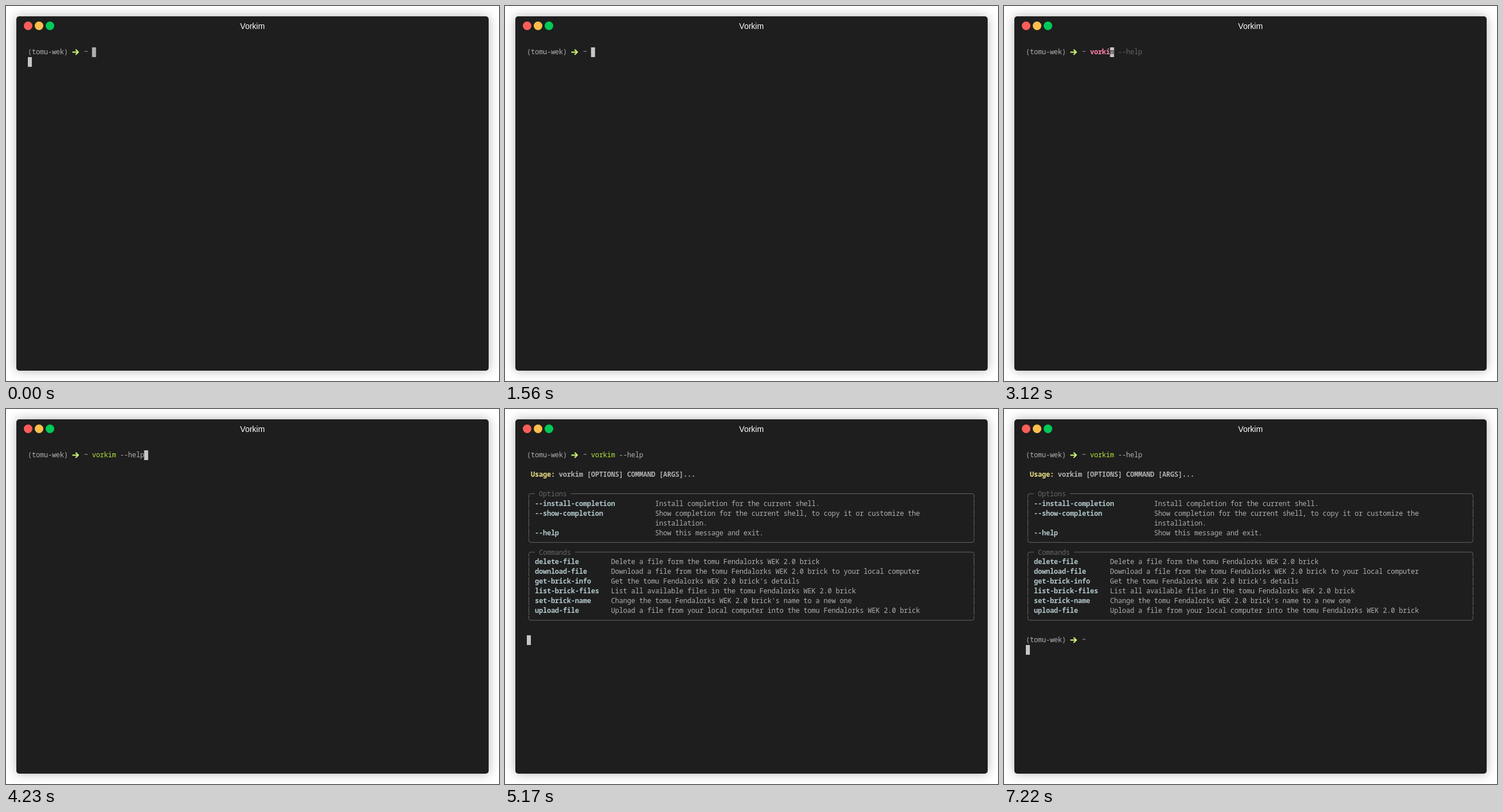
Recreate the animation shown at these times as an HTML page with a canvas. Size 858 by 653 pixels, loop 8390 ms.

```html
<!DOCTYPE html>
<html lang="en">
<head>
<meta charset="utf-8">
<title>Vorkim</title>
<style>
  html, body { margin: 0; width: 858px; height: 653px; overflow: hidden; background: #fff; }
  .window {
    position: absolute; left: 18px; top: 18px; width: 822px; height: 617px;
    border-radius: 5px; background: #1e1e1e; box-shadow: 0 0 18px rgba(0, 0, 0, .3);
  }
  canvas { position: absolute; left: 0; top: 0; }
</style>
</head>
<body>
<div class="window"></div>
<canvas id="stage" width="858" height="653"></canvas>
<script>
const ctx = document.getElementById('stage').getContext('2d');
const LOOP = 8390;
const LEFT = 38, TOP = 72, CELL = 6.98, LINE = 16.95;
const COLS = 112, INPUT = 16;
const FONT = '11.97px "Noto Sans Mono", "DejaVu Sans Mono", monospace';
const FG = '#afafaf', CURSOR = '#c7c7c7', BG = '#1e1e1e', DIM = '#666666', HINT = '#626566';
const GREEN = '#b3e33b', LIME = '#c8ed71', PINK = '#ff7fac', YELLOW = '#ebdf86', CYAN = '#b1c6ca';

const CMD = 'vorkim', ARGS = ' --help';
const KIT = 'tomu Fendalorks WEK 2.0 brick';
const OPTIONS = [
  ['--install-completion', 'Install completion for the current shell.'],
  ['--show-completion', 'Show completion for the current shell, to copy it or customize the'],
  ['', 'installation.'],
  ['--help', 'Show this message and exit.']
];
const COMMANDS = [
  ['delete-file', `Delete a file form the ${KIT}`],
  ['download-file', `Download a file from the ${KIT} to your local computer`],
  ['get-brick-info', `Get the ${KIT}'s details`],
  ['list-brick-files', `List all available files in the ${KIT}`],
  ['set-brick-name', `Change the ${KIT}'s name to a new one`],
  ['upload-file', `Upload a file from your local computer into the ${KIT}`]
];

// [start, typed characters, suggestion visible]
const TYPING = [
  [1560, 0, false], [2210, 1, false], [2310, 1, true], [2620, 2, false], [2720, 2, true],
  [2870, 3, true], [2980, 4, true], [3120, 5, true], [3390, 6, true], [3490, 7, true],
  [4230, 13, false]
];

const colX = col => LEFT + col * CELL;
const rowY = row => TOP + row * LINE;

function text(row, col, str, color, bold) {
  ctx.font = (bold ? 'bold ' : '') + FONT;
  ctx.textAlign = 'left';
  ctx.fillStyle = color;
  [...str].forEach((ch, i) => {
    if (ch !== ' ') ctx.fillText(ch, colX(col + i), rowY(row) + 12);
  });
}

function block(row, col, color = CURSOR) {
  ctx.fillStyle = color;
  ctx.fillRect(colX(col), rowY(row), CELL, LINE);
}

function stroke(color, width, draw) {
  ctx.strokeStyle = color;
  ctx.lineWidth = width;
  ctx.beginPath();
  draw();
  ctx.stroke();
}

function prompt(row) {
  text(row, 0, '(tomu-wek)', FG);
  text(row, 14, '~', FG);
  const y = rowY(row) + 8.3;
  ctx.lineCap = ctx.lineJoin = 'round';
  stroke(LIME, 2.2, () => {
    ctx.moveTo(116.3, y);
    ctx.lineTo(125.5, y);
    ctx.moveTo(121.8, y - 3.9);
    ctx.lineTo(125.9, y);
    ctx.lineTo(121.8, y + 3.9);
  });
  ctx.lineCap = 'butt';
}

function panel(row, title, items, descCol) {
  const l = colX(0.5), r = colX(COLS - 0.5), last = row + items.length + 1;
  const top = rowY(row) + 7.7, bottom = rowY(last) + 7.7, bend = 3.5;
  stroke(DIM, 1, () => {
    ctx.moveTo(l, rowY(row) + 15.6);
    ctx.arcTo(l, top, l + bend, top, bend);
    ctx.lineTo(colX(2), top);
    ctx.moveTo(colX(title.length + 4), top);
    ctx.arcTo(r, top, r, top + bend, bend);
    ctx.lineTo(r, rowY(row) + 15.6);
    ctx.moveTo(l, rowY(last));
    ctx.arcTo(l, bottom, l + bend, bottom, bend);
    ctx.arcTo(r, bottom, r, bottom - bend, bend);
    ctx.lineTo(r, rowY(last));
    for (let i = row + 1; i < last; i++) {
      for (const x of [l, r]) {
        ctx.moveTo(x, rowY(i));
        ctx.lineTo(x, rowY(i) + 15.6);
      }
    }
  });
  text(row, 3, title, DIM);
  items.forEach(([name, desc], i) => {
    text(row + 1 + i, 2, name, CYAN, true);
    text(row + 1 + i, descCol, desc, FG);
  });
}

function titleBar() {
  ['#fd5d59', '#fdbe4c', '#00ca57'].forEach((color, i) => {
    ctx.fillStyle = color;
    ctx.beginPath();
    ctx.arc(38.5 + 19 * i, 34.5, 7.5, 0, Math.PI * 2);
    ctx.fill();
  });
  ctx.font = '14px "Liberation Sans", Arial, sans-serif';
  ctx.textAlign = 'center';
  ctx.fillStyle = '#fff';
  ctx.fillText('Vorkim', 429, 40);
}

function inputLine(count, hint) {
  const full = CMD + ARGS, known = count >= CMD.length;
  const typed = full.slice(0, count);
  text(0, INPUT, typed.slice(0, CMD.length), known ? GREEN : PINK, !known);
  text(0, INPUT + CMD.length, typed.slice(CMD.length), FG);
  if (hint) text(0, INPUT + count, full.slice(count), HINT);
  return INPUT + count;
}

function draw(t) {
  ctx.clearRect(0, 0, 858, 653);
  titleBar();
  prompt(0);

  if (t < 1560) {
    block(0, INPUT, FG);
    if (t < 20) return block(1, 0);
    prompt(1);
    return block(1, INPUT);
  }

  if (t < 4880) {
    const [, count, hint] = TYPING.filter(step => step[0] <= t).pop();
    const col = inputLine(count, hint);
    block(0, col);
    if (hint) text(0, col, (CMD + ARGS)[count], BG);
    return;
  }

  inputLine(13, false);
  if (t < 5070) return block(1, 0);

  text(2, 1, 'Usage:', YELLOW, true);
  text(2, 8, CMD + ' [OPTIONS] COMMAND [ARGS]...', FG, true);
  if (t < 5170) return block(4, 0);

  panel(4, 'Options', OPTIONS, 32);
  panel(10, 'Commands', COMMANDS, 21);
  if (t < 5220) return block(19, 0);

  prompt(19);
  if (t < 7220) block(19, INPUT);
  else block(20, 0);
}

const start = performance.now();
function tick() {
  draw((performance.now() - start) % LOOP);
  requestAnimationFrame(tick);
}
tick();
</script>
</body>
</html>
```
